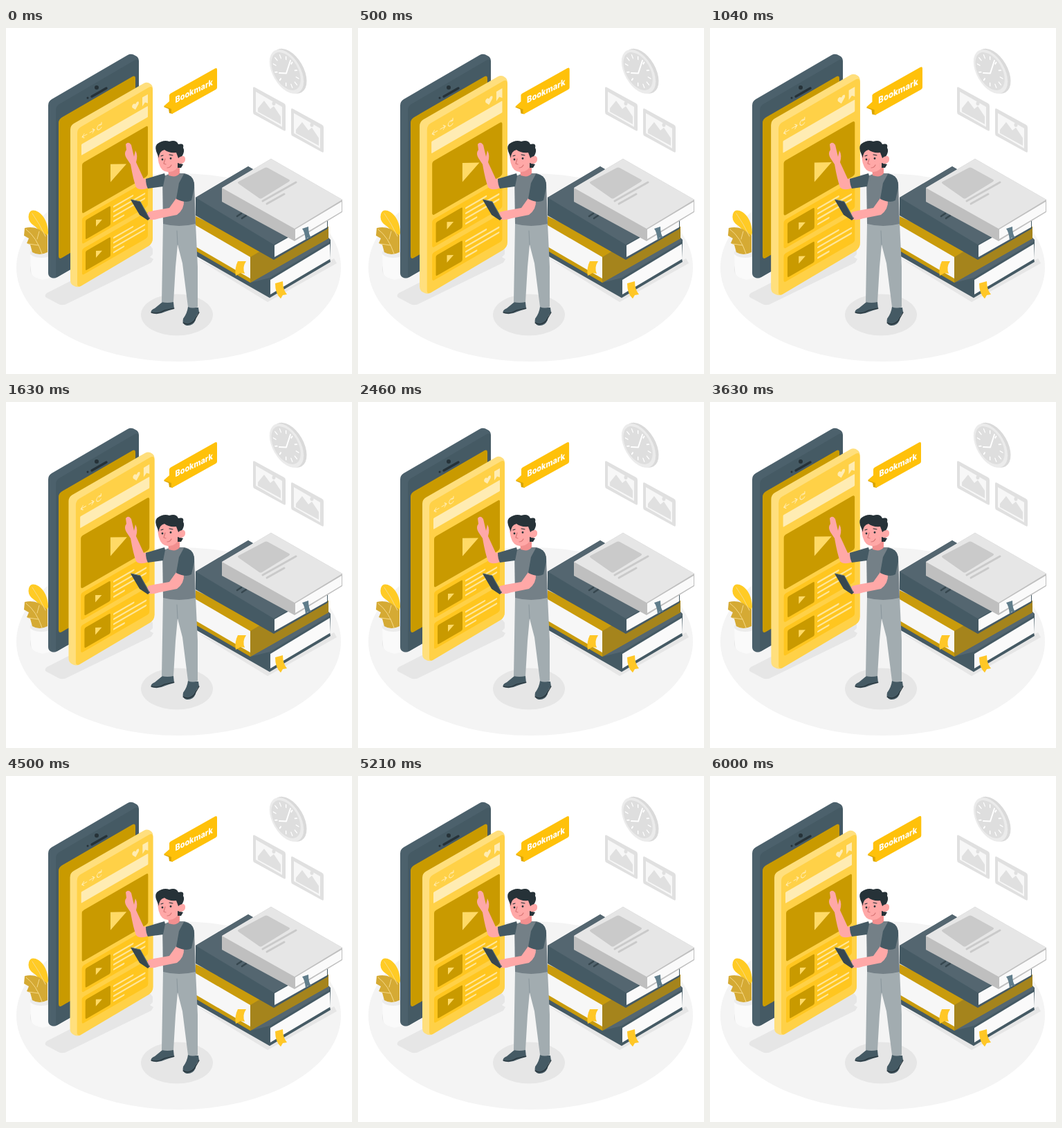
An HTML page that plays this animation: 500x500 px, repeating every 6040 ms.

```html
<!DOCTYPE html>
<html lang="en">
<head>
<meta charset="utf-8">
<title>Bookmark</title>
<style>
  html, body { margin: 0; width: 100%; height: 100%; overflow: hidden; background: #fff; }
  svg { display: block; width: 100%; height: 100%; }
  .line { fill: none; stroke-linecap: round; stroke-linejoin: round; }
  .dark { fill: #455a64; }
  .skin { fill: #ffa8a7; }
  .gold { fill: #c99a00; }
  .pale { fill: #ffecb3; }
  .label { font: 800 12.5px Inter, sans-serif; fill: #fff; }
</style>
</head>
<body>
<svg viewBox="0 0 500 500">
  <defs>
    <g id="frame">
      <path d="M357 87Q357 84 360 86L402 109Q404 110 404 113V147Q404 150 401 148L359 125Q357 124 357 121Z" fill="#e0e0e0"/>
      <path d="M361 92L399 114V143L361 121Z" fill="#f7f7f7"/>
      <path d="M364 121V116L373 105 382 117 387 113 397 128V139Z" fill="#e0e0e0"/>
      <ellipse cx="387" cy="109" rx="2.500" ry="3" fill="#e0e0e0"/>
    </g>
    <g id="row">
      <rect x="110" y="278" width="95" height="38" rx="3" fill="#ffc61f"/>
      <rect x="115" y="284" width="36" height="28" rx="2" class="gold"/>
      <path d="M130 292L139 297 130 302Z" fill="#ffda66"/>
      <path d="M156 288h27M156 295h44M156 302h44M156 309h14" class="line" stroke="#ffe699" stroke-width="2.400"/>
    </g>
  </defs>

  <!-- floor and shadows -->
  <ellipse cx="249.500" cy="346" rx="234.500" ry="136" fill="#f4f4f4"/>
  <path d="M59 383L195 314Q203 310 209 315L212 319V327L208 331 213 334 210 339 89 398Q82 402 76 399L59 390Q54 387 59 383Z" fill="#e6e6e6"/>
  <ellipse cx="247" cy="414.500" rx="52" ry="30" fill="#e6e6e6"/>
  <path d="M274 332L378 396 478 340 474 333 380 384Z" fill="#e6e6e6"/>
  <ellipse cx="53" cy="349" rx="18" ry="14" fill="#e6e6e6"/>

  <!-- wall -->
  <g transform="matrix(.866 .5 0 1 405.500 63)">
    <circle cx="4.500" cy="-3" r="29" fill="#dadada"/>
    <circle r="28.500" fill="#ebebeb"/>
    <circle cx="-1" r="24.500" fill="#dedede"/>
    <g id="ticks" class="line" stroke="#fff" stroke-width="1.700"></g>
  </g>
  <path d="M395 65L405 65.500 411 47" class="line" stroke="#fff" stroke-width="2"/>
  <use href="#frame"/>
  <use href="#frame" x="55" y="31"/>

  <!-- plant -->
  <path d="M35 325H68V358Q56 367 43 361 36 358 36 350Z" fill="#fafafa"/>
  <ellipse cx="51" cy="325" rx="16" ry="7" fill="#ececec"/>
  <path d="M33 269Q36 260 47 266 60 275 61 296L58 306Q48 290 37 283 31 277 33 269Z" fill="#ffcb25"/>
  <path d="M27 289Q38 286 48 291L60 300V324Q48 330 38 324L35 313 30 311 33 304 26 300Z" fill="#d5aa34"/>
  <path d="M38 268Q48 282 57 301M29 291Q44 302 52 326M33 312L47 314M48 294L45 305" class="line" stroke="#f6d988" stroke-width="1"/>

  <!-- phone -->
  <path d="M61 112Q61 106 66 103L176 39Q181 36 187 40 192 42 192 48V292L74 360Q69 363 64 360 61 358 61 354Z" fill="#4c616c"/>
  <path d="M72 119Q72 113 77 110L185 47Q192 43 192 50V292L74 360Q72 361 72 357Z" class="dark"/>
  <path d="M76 137Q76 132 81 129L183 70Q187 68 187 73V270L81 332Q76 335 76 329Z" class="gold"/>
  <path d="M124 99L145 87" class="line" stroke="#263238" stroke-width="3.500"/>
  <circle cx="131" cy="86" r="3" fill="#263238"/>
  <circle cx="118" cy="101" r="1.500" fill="#263238"/>

  <!-- floating page -->
  <g id="page">
    <path d="M93 147Q93 141 98 138L199 80Q204 77 209 81 212 83 212 88V304Q212 311 206 315L108 373Q103 376 97 372 93 370 93 364Z" fill="#ffdf7d"/>
    <path d="M103 152Q103 146 108 143L206 86Q212 83 212 90V304Q212 311 206 315L108 373Q103 375 103 370Z" fill="#ffd147"/>
    <g transform="translate(104) skewY(-30) translate(-104)">
      <rect x="109" y="171" width="96" height="16" rx="1" class="pale"/>
      <rect x="110" y="199" width="95" height="73" rx="3" class="gold"/>
      <path d="M151 224L174 237 151 250Z" fill="#ffda66"/>
      <use href="#row"/>
      <use href="#row" y="45"/>
      <path d="M117 161h-7l3-3m-3 3l3 3M121 161h7l-3-3m3 3l-3 3M138 159a3.500 3.500 0 1 0 0 4M138 156v3h-3" class="line" stroke="#ffecb3" stroke-width="1"/>
      <path d="M187 166L182.500 160.500Q181 156 185 156L187 158 189 156Q193 156 191.500 160.500Z" class="pale"/>
      <path d="M197 154H205V167L201 163.500 197 167Z" class="pale"/>
    </g>
  </g>

  <!-- speech bubble -->
  <g id="bubble">
    <path d="M237 106L228 114 235 117 236 123 241 124 240 108Z" fill="#d9a400"/>
    <path d="M236 98Q235.500 96 238 94.500L302 58.500Q305 57 305 60V86Q305 88 303 89L242 123Q239 124.500 239 122V117L228 113 236 106Z" fill="#ffc10a"/>
    <text class="label" transform="matrix(.866 -.42 0 1 244.500 108.500)">Bookmark</text>
  </g>

  <!-- books, bottom to top -->
  <path d="M274 318L353 345 466 303 469 306V310L468 333 469 338 381 390 274 329Z" class="dark"/>
  <path d="M353 368L466 304 469 308 381 361Z" fill="#546670"/>
  <path d="M382 364L468 312V334L382 385Z" fill="#fafafa"/>
  <path d="M389 369L400 366Q400 378 406 385L400 386 397 391Q389 384 389 369Z" fill="#ffc727"/>

  <path d="M274 272L387 326 466 287V304L353 368 274 322Z" fill="#c99b0c"/>
  <path d="M353 331L387 311 466 287V304L353 368Z" fill="#a5841c"/>
  <path d="M274 285L353 331V362L274 316Z" fill="#f7f7f7"/>
  <path d="M335 337L347 337Q341 346 345 355L339 354 332 358Q330 347 335 337Z" fill="#ffc727"/>

  <path d="M274 245L350 200 465 268V290L387 335 274 271Z" class="dark"/>
  <path d="M274 245L350 200 465 268 387 313Z" fill="#546670"/>
  <path d="M388 314L464 271V288L388 331Z" fill="#fafafa"/>
  <path d="M334 272L340 268M341 275L347 271" class="line" stroke="#37474f" stroke-width="2.500"/>

  <path d="M312 231L383 189 486 248V266L417 308 312 251Z" fill="#bfbfbf"/>
  <path d="M312 231L383 189 486 248 417 290Z" fill="#e6e6e6"/>
  <path d="M418 291L485 251V265L418 305Z" fill="#fafafa"/>
  <path d="M336 222L374 202Q376 201 378 202L409 219Q411 220 409 222L370 246Q368 247 366 246L336 225Q334 223 336 222Z" fill="#cacaca"/>
  <path d="M371 250L419 223M377 254L402 240" class="line" stroke="#cacaca" stroke-width="3"/>
  <path d="M428 290L437 287Q437 298 441 303L436 303 433 307Q432 295 428 290Z" fill="#607d8b"/>

  <!-- reader -->
  <path d="M226 396H242L243 406Q235 408 230 410 220 415 210 412 208 408 215 405ZM263 403L278 404 279 411Q274 416 274 422 270 431 261 430 254 428 256 420 262 412 263 403Z" class="dark"/>
  <path d="M210 411Q219 414 229 408L243 405M256 426Q264 431 272 423L279 411" class="line" stroke="#263238" stroke-width="1.200"/>
  <path d="M227 282H274L277 345V403Q270 406 263 403L255 340 248 313 245 345 242 396Q233 398 225 396L226 340Z" fill="#a2acb0"/>
  <path d="M248 313L247 293" class="line" stroke="#88959b" stroke-width="1"/>
  <path d="M206 217L199 218 188 194Q191 184 187 177L185 186 181 169Q177 163 173 168L174 176Q170 181 174 188L180 197Q184 220 188 230 193 236 206 231Z" class="skin"/>
  <path d="M226 215L238 210 258 210Q270 213 272 224L274 283Q250 289 227 283Z" fill="#748087"/>
  <path d="M229 210L202 218Q202 226 205 232L227 229 230 214Z" class="dark"/>
  <path d="M234 202L251 195V210Q246 217 235 213Z" fill="#f28f8f"/>
  <path d="M219 180Q219 198 226 205 232 210 241 207 248 204 251 196 259 196 259 189 258 184 252 186L247 174 224 174Z" class="skin"/>
  <path d="M219 183Q214 173 218 168 227 161 236 164 246 161 249 168 258 166 256 173 259 178 254 186L249 188 246 180Q235 181 229 176 221 178 221 188ZM248 195L256 197 253 202 248 202Z" fill="#263238"/>
  <path d="M250 187Q259 182 259 190 258 197 250 196Z" class="skin"/>
  <g class="line" stroke="#263238" stroke-width="1.200">
    <path d="M224 185l3-1M236 183l5 1"/>
    <path d="M230 189L228 196 231 197M233 202Q237 202 239 198" stroke="#d97777"/>
  </g>
  <circle cx="226" cy="190" r="1.400" fill="#263238"/>
  <circle cx="238" cy="188.500" r="1.400" fill="#263238"/>
  <path d="M246 246L257 249Q258 262 247 270L222 275Q210 279 204 276L205 266 213 264 236 260Z" class="skin"/>
  <path d="M257 211Q273 212 272 231L268 249Q260 254 246 247L250 224Z" class="dark"/>
  <path d="M180 248L194 251 208 275 205 278 193 270Z" fill="#37474f"/>
  <path d="M181 248L194 251 207 275" class="line" stroke="#546e7a" stroke-width="1"/>
  <path d="M204 268L211 265 214 270 207 274Z" class="skin"/>
</svg>
<script>
  const LOOP = 6040;
  const PAGE_UNIT = 760, BUBBLE_UNIT = 190;
  const bubbleStarts = [0, 1900, 3800, 5460];
  const byId = id => document.getElementById(id);

  byId("ticks").innerHTML = Array.from({ length: 12 }, (_, i) =>
    `<path d="M-1 -21V-17" transform="rotate(${i * 30} -1 0)"/>`).join("");

  // Double heartbeat: up 1, down 2, rest 1, up 1, down 1 units.
  function heartbeat(time, unit) {
    const u = time / unit;
    const first = u < 1 ? u : (3 - u) / 2;
    const second = 1 - Math.abs(u - 5);
    return 1 + 0.1 * Math.max(0, first, second);
  }

  function scaleAbout(id, x, y, s) {
    byId(id).setAttribute("transform", `translate(${x} ${y}) scale(${s}) translate(${-x} ${-y})`);
  }

  const begin = performance.now();
  function draw() {
    const t = (performance.now() - begin) % LOOP;
    const start = bubbleStarts.filter(s => s <= t).pop();
    scaleAbout("page", 152.5, 227, heartbeat(t, PAGE_UNIT));
    scaleAbout("bubble", 266.5, 91, heartbeat(t - start, BUBBLE_UNIT));
    requestAnimationFrame(draw);
  }
  draw();
</script>
</body>
</html>
```
